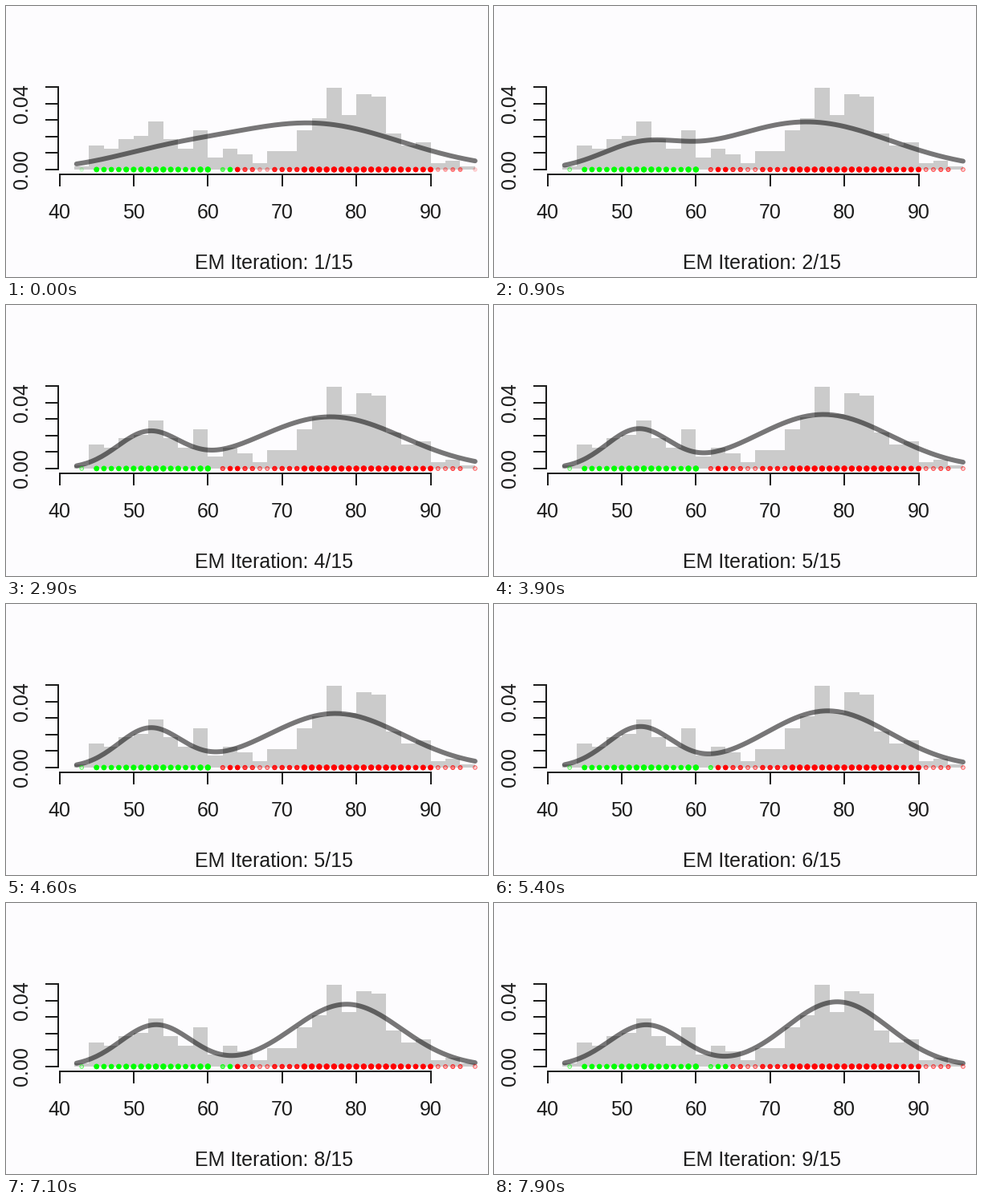
These frames come from a looping animation (600 px wide and 338 px high, 8 s). A matplotlib script:

```python
import numpy as np
import matplotlib.pyplot as plt
from matplotlib.animation import FuncAnimation

W, H, DPI = 600, 338, 100
FRAMES, STEP = 80, 100
INK, PAPER, BAR = "#1c1c1c", "#fdfcfe", "#cbcbcb"
PX = 72 / DPI  # points per pixel
MEAN, VAR = 70.9, 184.1  # of all waiting times

plt.rcParams["font.family"] = "Liberation Sans"

# Waiting times per two-minute bin, 42 to 96
bins = np.array([1, 8, 7, 10, 11, 16, 10, 7, 13, 4, 7, 5, 2, 6,
                 6, 13, 17, 27, 18, 25, 24, 12, 8, 9, 2, 3, 1])


def px(x):
    return 66.5 + (np.asarray(x) - 40) * 9.24


def py(d):
    return 204 - np.asarray(d) * 2055


def normal(x, mu, sd):
    return np.exp(-((x - mu) / sd) ** 2 / 2) / (sd * np.sqrt(2 * np.pi))


def components(k):
    """Weight of the short waits, then mean and sd of short and long waits.

    The start decays quickly, then both groups drift apart; the long waits
    follow from the overall mean and variance.
    """
    start = np.exp(-k / 1.15)
    w = .15 + .03 * k - .00115 * k ** 2
    m1 = 50.9 + .3 * k + 3.1 * start
    s1 = 3.3 + .21 * k + 4.5 * start
    m2 = (MEAN - w * m1) / (1 - w)
    s2 = np.sqrt((VAR - w * s1 ** 2) / (1 - w) - w * (m2 - m1) ** 2)
    return w, (m1, s1), (m2, s2)


fig = plt.figure(figsize=(W / DPI, H / DPI), dpi=DPI, facecolor=PAPER)
ax = fig.add_axes([0, 0, 1, 1])
ax.set_xlim(0, W)
ax.set_ylim(H, 0)
ax.axis("off")


def line(xs, ys):
    ax.plot(xs, ys, color=INK, lw=2 * PX, solid_capstyle="projecting")


def label(x, y, s, **kw):
    return ax.text(x, y, s, color=INK, size=25 * PX, ha="center", **kw)


# Histogram
edges = np.repeat(np.arange(42, 97, 2), 2)[1:-1]
ax.fill_between(px(edges), py(0), py(np.repeat(bins / (2 * bins.sum()), 2)),
                color=BAR, lw=0, antialiased=False)

# Axes
line([65, 65], [py(0), py(.05)])
for d in np.arange(6) / 100:
    line([50, 65], [py(d)] * 2)
for d in (0, .04):
    label(20, py(d), f"{d:.2f}", va="center", rotation=90)
line([px(40), px(90)], [209.5, 209.5])
for x in range(40, 91, 10):
    line([px(x)] * 2, [209.5, 223.5])
    label(px(x), 265, str(x), va="baseline")

# Mixture curve, class dots and caption
grid = np.linspace(42.3, 96, 160)
curve, = ax.plot([], [], color="black", alpha=.53, lw=6 * PX,
                 solid_capstyle="round", solid_joinstyle="round")
spots = np.setdiff1d(np.arange(43, 97), [44, 61, 95])
crowd = bins[(spots - 43) // 2]
fill = np.clip(crowd / 7, 0, 1)
size = 4.5 + 2 * np.clip(crowd / 12, 0, 1)
dots = ax.scatter(px(spots), np.full(len(spots), 204.0), s=(size * PX) ** 2,
                  linewidths=PX, zorder=5)
caption = label(333.5, 328, "", va="baseline")


def draw(i):
    k = (i + 1) // 10
    w, short, long = components(k)
    curve.set_data(px(grid), py(w * normal(grid, *short)
                                + (1 - w) * normal(grid, *long)))
    green = normal(spots, *short) > normal(spots, *long)
    rgba = np.zeros((len(spots), 4))
    rgba[green, 1] = 1
    rgba[~green, 0] = 1
    rgba[:, 3] = .5 + fill / 2
    dots.set_edgecolor(rgba)
    rgba[:, 3] = fill
    dots.set_facecolor(rgba)
    caption.set_text(f"EM Iteration: {k + 1}/15")
    return curve, dots, caption


anim = FuncAnimation(fig, draw, frames=FRAMES, interval=STEP,
                     repeat=True, repeat_delay=0)
plt.show()
```
